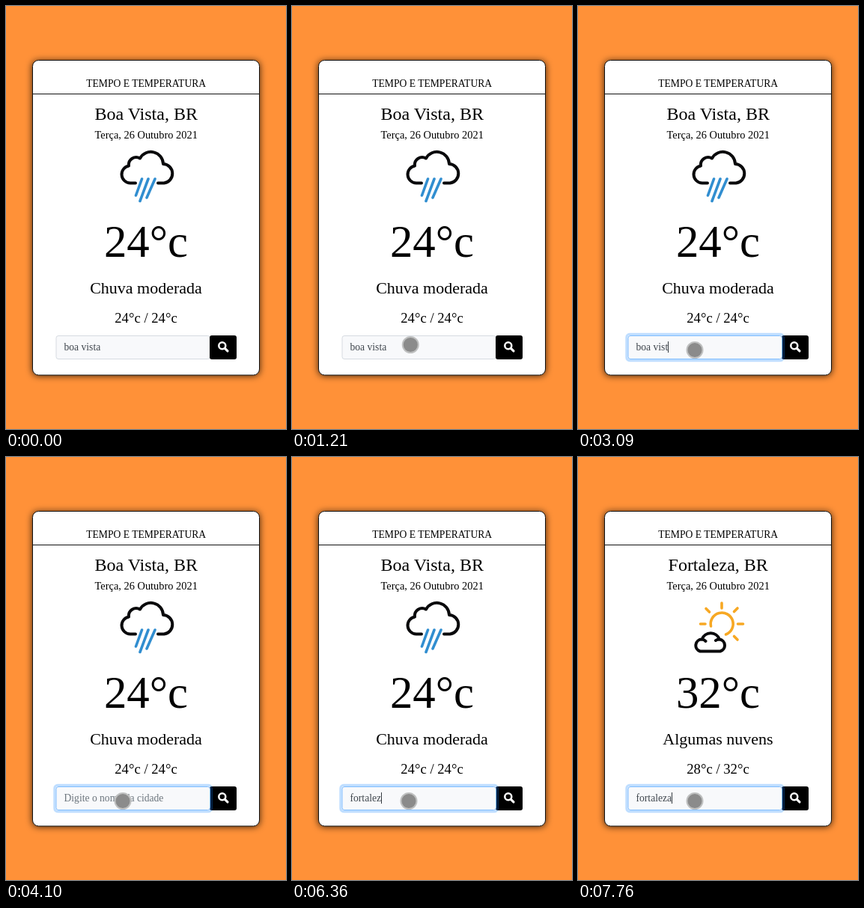
Write an HTML page that moves like this. It is 374 by 565 pixels and loops after 8 s.

```html
<!DOCTYPE html>
<html lang="pt-BR">
<head>
<meta charset="utf-8">
<title>Tempo e temperatura</title>
<style>
html, body { margin: 0; width: 100%; height: 100%; overflow: hidden; background: #ff9138; }
svg { display: block; width: 100%; height: 100%; }
text { font-family: "Liberation Serif", "Times New Roman", serif; text-anchor: middle; fill: #000; }
#value, #placeholder { font-size: 13.6px; text-anchor: start; fill: #3f464d; }
#placeholder { fill: #6c757d; }
.line { fill: none; stroke-linecap: round; stroke-linejoin: round; stroke-width: 4; }
.black { stroke: #0a0a0c; }
.blue { stroke: #318ed0; stroke-width: 3.6; }
.sun { stroke: #f7a823; stroke-width: 3.6; }
</style>
</head>
<body>
<svg viewBox="0 0 374 565">
  <defs>
    <filter id="blur" x="-10%" y="-10%" width="120%" height="120%"><feGaussianBlur stdDeviation="5"/></filter>
  </defs>
  <rect width="374" height="565" fill="#ff9138"/>
  <rect x="35" y="73" width="304" height="421" rx="8" fill="#000" fill-opacity=".75" filter="url(#blur)"/>
  <rect x="35.5" y="72.5" width="303" height="420.5" rx="8" fill="#fff" stroke="#111"/>
  <path d="M36 117.5H338" stroke="#111"/>

  <text x="187.2" y="108" font-size="13.6">TEMPO E TEMPERATURA</text>
  <text id="city" x="187.2" y="152" font-size="24"></text>
  <text x="187.2" y="177" font-size="14.4">Terça, 26 Outubro 2021</text>
  <text id="temp" x="187" y="334.5" font-size="60.8"></text>
  <text id="sky" x="187" y="384" font-size="22"></text>
  <text id="range" x="187" y="422.5" font-size="18.7"></text>

  <g id="rain">
    <path class="line black" d="M173 236.5H166A11.6 11.6 0 0 1 164 213.5A10 10 0 0 1 179 203.5A16.5 16.5 0 0 1 210 211A12.8 12.8 0 0 1 211 236.5H203"/>
    <path class="line blue" d="M181.5 231L173.5 253M190 231L179 260.5M199 231L188 256"/>
  </g>
  <g id="sunny">
    <path class="line sun" d="M177.5 226A15 15 0 1 1 197.5 237M192 195V202M213.5 223H220.5M163.5 223H170M171 202.5L175.5 207M213 202L208.5 206.5M208.5 239.5L213 244"/>
    <path class="line black" d="M163 259.5A8.2 8.2 0 0 1 165.5 243.5A12.5 12.5 0 0 1 189 243.5A8.2 8.2 0 0 1 190 259.5ZM165.5 243.5Q169 244 170.5 246M189 243.5Q186 243.5 184 245"/>
  </g>

  <g id="search">
    <g id="input">
      <rect id="ring" fill="none" stroke="#007bff" rx="4"/>
      <rect id="field" x="67" y="440.5" width="205.5" height="31" rx="3" fill="#f8f9fb"/>
    </g>
    <g id="button" fill="none" stroke="#fff">
      <rect x="272" y="440" width="36" height="32" rx="3" fill="#000" stroke="none"/>
      <circle cx="288.8" cy="453.7" r="4.5" stroke-width="2.5"/>
      <path d="M292.2 457.1L296 460.9" stroke-width="3.1" stroke-linecap="round"/>
    </g>
  </g>
  <text id="placeholder" x="77.5" y="460">Digite o nome da cidade</text>
  <text id="value" x="77.5" y="460"></text>
  <rect id="caret" y="448" width="1" height="15" fill="#343a40"/>
  <circle id="pointer" r="10.5" stroke-width="2"/>
</svg>
<script>
const LOOP = 8000;
const el = Object.fromEntries([...document.querySelectorAll('[id]')].map(e => [e.id, e]));

// time, text, caret visible
const typing = [
  [0, 'boa vista', 0], [2300, 'boa vista', 1], [3020, 'boa vista', 0], [3090, 'boa vist', 1],
  [3640, 'boa v', 1], [3720, 'b', 1], [3800, '', 1], [4100, '', 0],
  [4330, 'f', 1], [4480, 'fo', 1], [4650, 'for', 1], [4870, 'fort', 1], [5350, 'fort', 0],
  [5500, 'forta', 1], [5730, 'fortal', 1], [5900, 'fortale', 1], [6360, 'fortalez', 1],
  [6590, 'fortaleza', 1], [7140, 'fortaleza', 0], [7610, 'fortaleza', 1]
];
// time, x, y
const moves = [
  [0, -40, -40], [230, 343, 275], [310, 205, 352], [390, 146, 380.5],
  [980, 147, 386], [1060, 152, 415], [1140, 157, 442], [1210, 158.3, 452.5],
  [1290, 157, 457], [1370, 156, 459.5]
];
// time, focus amount, pressed
const focus = [[0, 0, 0], [2300, .15, 1], [2380, .75, 1], [2460, 1, 0]];
const weather = [
  [0, 'Boa Vista, BR', '24°c', 'Chuva moderada', '24°c / 24°c', 'rain'],
  [7760, 'Fortaleza, BR', '32°c', 'Algumas nuvens', '28°c / 32°c', 'sunny']
];

const at = (steps, t) => steps.findLast(s => s[0] <= t).slice(1);
const set = (e, attrs) => { for (const k in attrs) e.setAttribute(k, attrs[k]); };
const show = (e, on) => e.setAttribute('visibility', on ? 'visible' : 'hidden');
const mix = (a, b, p) => `rgb(${a.map((v, i) => Math.round(v + (b[i] - v) * p))})`;

function render(t) {
  const [city, temp, sky, range, icon] = at(weather, t);
  Object.entries({ city, temp, sky, range }).forEach(([id, s]) => el[id].textContent = s);
  show(el.rain, icon === 'rain');
  show(el.sunny, icon === 'sunny');

  const [text, caret] = at(typing, t);
  el.value.textContent = text;
  show(el.placeholder, !text);
  show(el.caret, caret);
  const width = text ? el.value.getComputedTextLength() : 0;
  el.caret.setAttribute('x', Math.round(77.5 + width));

  // The focused input is stacked above the button.
  const [p, pressed] = at(focus, t);
  el.search.prepend(p ? el.button : el.input);
  const w = 3.2 * p;
  set(el.ring, {
    x: 66.5 - w / 2, y: 440 - w / 2, width: 206.5 + w, height: 32 + w,
    'stroke-width': w, 'stroke-opacity': .25 * p
  });
  el.field.setAttribute('stroke', mix([214, 219, 225], [128, 189, 255], p));

  const [cx, cy] = at(moves, t);
  set(el.pointer, {
    cx, cy,
    fill: pressed ? '#c3c14b' : '#8b8b8b',
    stroke: pressed ? '#d8da70' : '#bfc0c0'
  });
}

const start = performance.now();
function tick() {
  render((performance.now() - start) % LOOP);
  requestAnimationFrame(tick);
}
tick();
</script>
</body>
</html>
```
